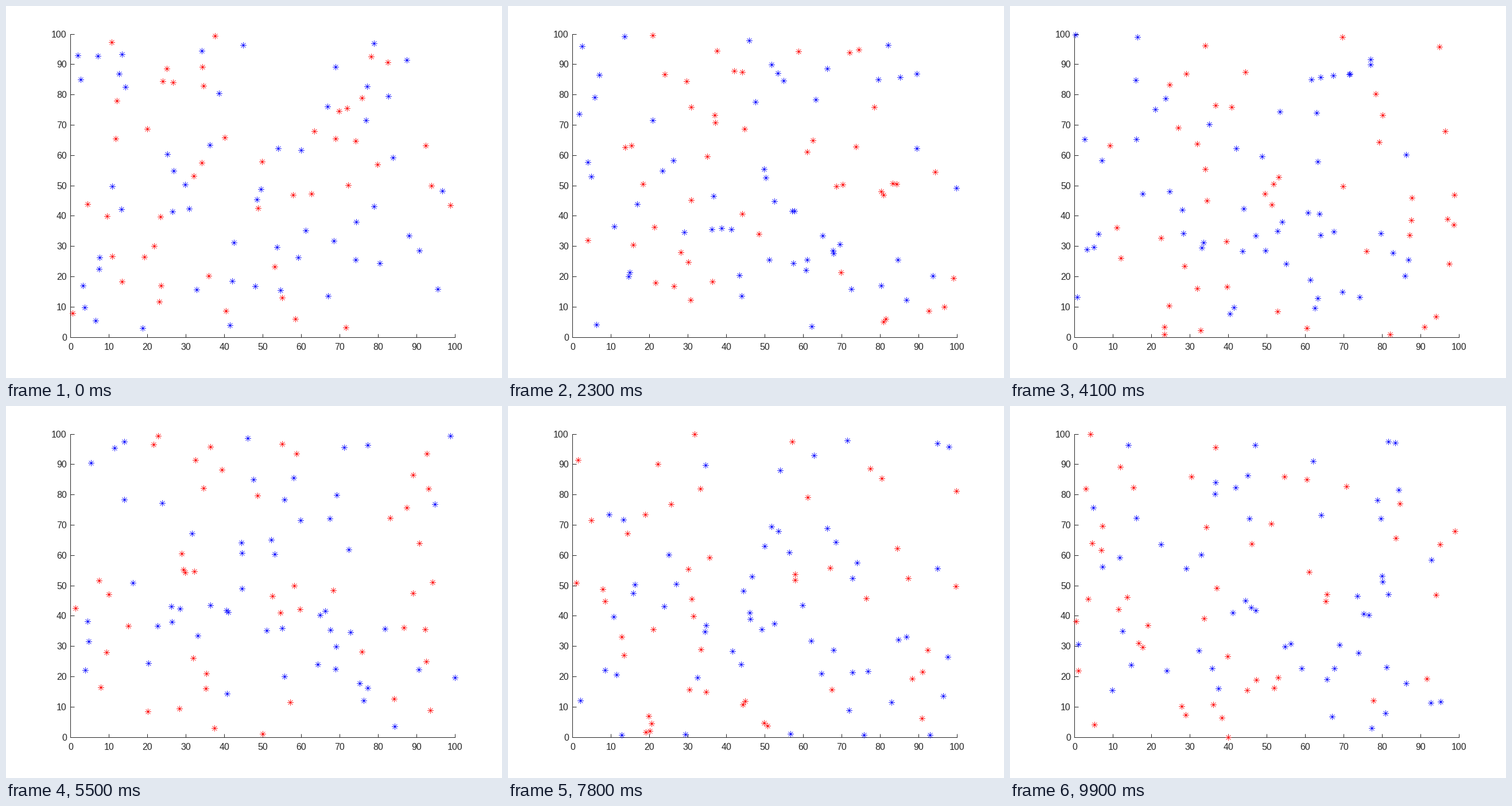
These frames come from a looping animation (864 px wide and 648 px high, 10000 ms). A matplotlib script:

```python
import numpy as np
import matplotlib.pyplot as plt
from matplotlib.animation import FuncAnimation
from matplotlib.path import Path

W, H = 864, 648
FRAMES = 100
COUNT = 100      # walkers, about half of them red
SIZE = 100       # side of the periodic box
RADIUS = 5.25    # range at which opposite colours avoid each other
INK = "0.15"


def unit(v):
    length = np.linalg.norm(v, axis=-1, keepdims=True)
    return v / np.maximum(length, 1e-9)


def steer(pos, heading, is_red):
    """Turn from nearby walkers of the other colour, most when facing them."""
    gap = pos[:, None] - pos[None]
    near = np.linalg.norm(gap, axis=2) < RADIUS
    rival = is_red[:, None] != is_red[None]
    away = unit(gap)
    facing = (away * heading[:, None]).sum(axis=2)
    push = (near & rival) * (1 - 0.75 * facing)
    return unit(heading + (push[..., None] * away).sum(axis=1))


def simulate():
    """Unit-speed walkers: red sets off to the right, blue to the left."""
    x, y, kind = np.random.RandomState(5489).random_sample((COUNT, 3)).T
    pos = SIZE * np.column_stack([x, y])
    is_red = kind < 0.5
    heading = np.column_stack([np.where(is_red, 1.0, -1.0), np.zeros(COUNT)])
    track = []
    for _ in range(FRAMES):
        heading = steer(pos, heading, is_red)
        pos = (pos + heading) % SIZE
        track.append((pos[is_red], pos[~is_red]))
    return track


def asterisk():
    d = 0.7
    arms = [(1, 0), (0, 1), (d, d), (d, -d)]
    verts = [p for x, y in arms for p in ((-x, -y), (x, y))]
    return Path(verts, [Path.MOVETO, Path.LINETO] * len(arms))


plt.rcParams["font.family"] = "Liberation Sans"
fig = plt.figure(figsize=(W / 72, H / 72), dpi=72, facecolor="white")
ax = fig.add_axes((0.13, 0.11, 0.775, 0.815))
ax.set(xlim=(0, SIZE), ylim=(0, SIZE),
       xticks=range(0, 101, 10), yticks=range(0, 101, 10))
ax.spines[["top", "right"]].set_visible(False)
ax.spines[["left", "bottom"]].set(color=INK, linewidth=1)
ax.tick_params(direction="in", length=6.5, width=1, color=INK,
               labelcolor=INK, labelsize=16)
ax.tick_params(axis="x", pad=10)
ax.tick_params(axis="y", pad=6.5)

track = simulate()
star = dict(marker=asterisk(), markersize=11, markeredgewidth=0.8,
            linestyle="none", clip_on=False, zorder=3)
dots = [ax.plot([], [], color=c, **star)[0] for c in ("#ff0000", "#0000ff")]


def update(i):
    for line, pos in zip(dots, track[i % FRAMES]):
        line.set_data(pos[:, 0], pos[:, 1])
    return dots


anim = FuncAnimation(fig, update, frames=FRAMES, interval=100,
                     repeat=True, repeat_delay=0, blit=False)
plt.show()
```
